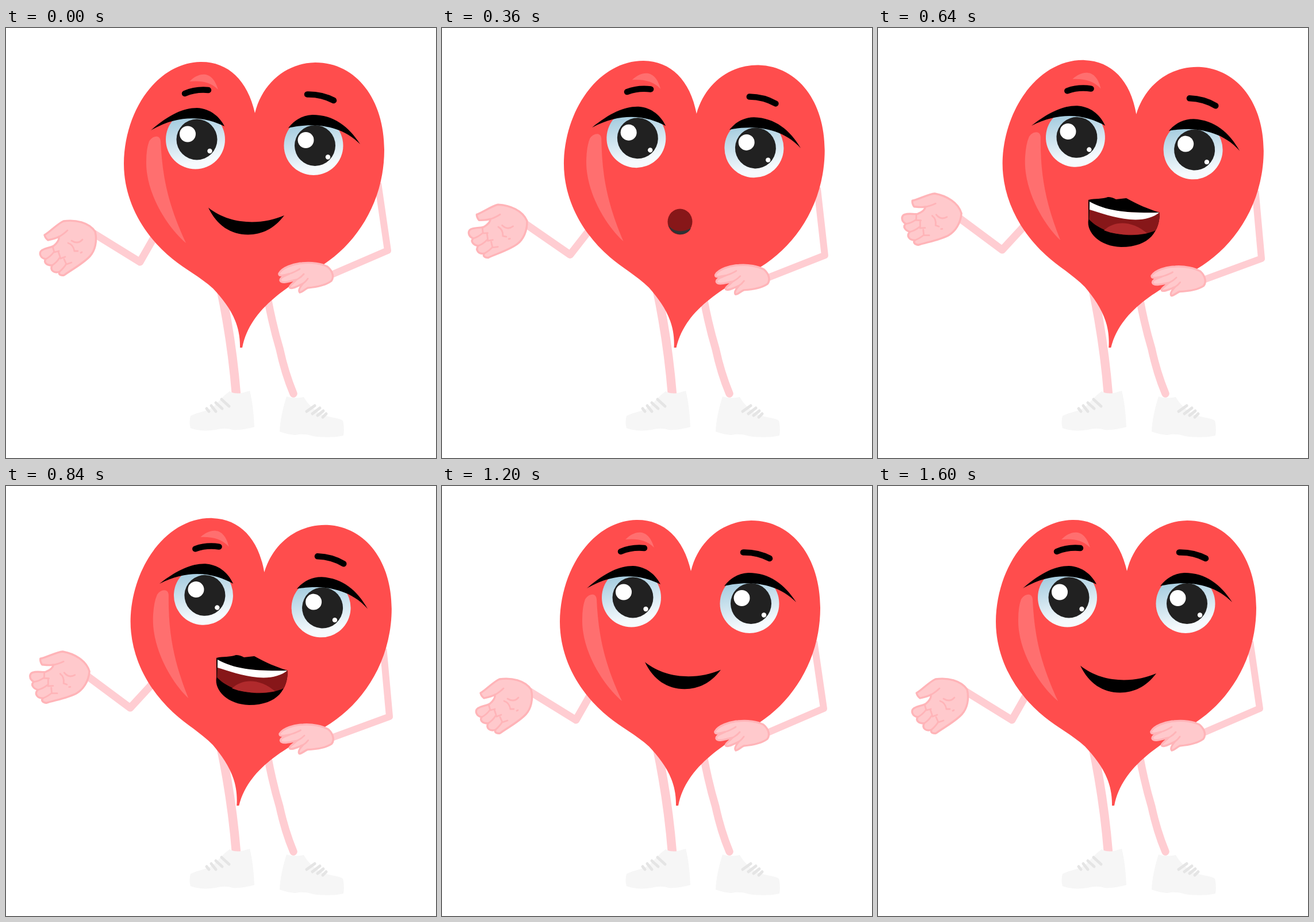
Animation, 748 px wide and 748 px high, one loop 1640 ms. Source, as an HTML page:

```html
<!DOCTYPE html>
<html lang="en">
<head>
<meta charset="utf-8">
<title>Talking heart</title>
<style>
  html, body { margin: 0; width: 100%; height: 100%; overflow: hidden; background: #fff; }
  svg { display: block; width: 100%; height: 100%; }
  .limb { fill: none; stroke: #ffcdd2; stroke-linejoin: round; }
  .skin { fill: #ffc9cc; stroke: #ffb4b8; stroke-width: 3.4; stroke-linejoin: round; }
  .crease { fill: none; stroke: #ffb4b8; stroke-width: 2.8; stroke-linecap: round; }
  .shoe { fill: #f6f6f6; }
  .lace { fill: none; stroke: #e5e5e5; stroke-width: 5; stroke-linecap: round; }
  .shine { fill: #ff6f6f; }
  .brow { fill: none; stroke: #000; stroke-width: 10.5; stroke-linecap: round; }
  .lid { fill: #871719; }
</style>
</head>
<body>
<svg viewBox="0 0 748 748">
  <defs>
    <linearGradient id="sclera" x1="0.2" y1="0" x2="0.45" y2="1">
      <stop offset="0.15" stop-color="#a6cde0"/>
      <stop offset="0.9" stop-color="#f6fafd"/>
    </linearGradient>
    <clipPath id="leftClip"><path id="leftCover"/></clipPath>
    <clipPath id="rightClip"><path id="rightCover"/></clipPath>
    <g id="eye">
      <circle cx="-2.5" cy="0" r="51.5" fill="url(#sclera)"/>
      <circle r="35.5" fill="#212121"/>
      <circle cx="-16" cy="-9.5" r="14" fill="#fff"/>
      <circle cx="22.5" cy="20" r="4.2" fill="#fff"/>
    </g>
  </defs>

  <g id="legs">
    <path class="limb" stroke-width="15.5" d="M374 455Q393 545 400.5 637"/>
    <path class="limb" stroke-width="13.5" stroke-linecap="round" stroke-linejoin="round" d="M455 470Q464 518 476 558Q485 600 500 636"/>
    <path class="shoe" d="M321 675C335 667 352 668 365 655C376 643 382 637 389 632Q397 637 410 635L424 631C429 650 431 672 432 694C420 697 408 700 394 699C386 696 375 696 365 699Q340 703 321 696Q318 686 321 675Z"/>
    <path class="lace" d="M375 646L388 658M365 652L376 662M357 657L365 667M349 662L353 667"/>
    <path class="shoe" d="M488 641Q500 645 518 642C525 654 534 663 547 671C560 678 577 677 586 683Q589 695 587 709C570 713 547 712 534 710C523 706 511 706 503 708Q489 707 476 702C477 681 482 660 488 641Z"/>
    <path class="lace" d="M523 667L537 657M533 671L546 661M542 674L552 666M551 677L557 671"/>
  </g>

  <path id="arm" class="limb" stroke-width="13"/>
  <g id="palm">
    <path class="skin" d="M67 360C75 356 90 340 100 336C121 333 144 338 155 354C159 371 155 387 146 397C134 410 113 421 101 430C94 431 91 428 93 424C84 427 76 422 80 413C71 413 65 408 69 402C59 400 57 391 62 387C69 382 78 382 83 379C89 374 93 369 92 363C85 367 77 368 73 369Q68 365 67 360Z"/>
    <path class="crease" d="M91 364Q101 358 107 352M69 402Q77 398 83 390M80 413Q88 408 93 400M93 424Q101 417 105 410M81 380L84 390L92 388M91 389L95 401L103 398M101 402L105 411L114 408M114 370Q125 377 133 368M108 374Q117 377 119 388L125 388M130 391L132 390"/>
  </g>

  <g id="body">
    <path class="limb" stroke-width="12" d="M647 270L664 387L562 431"/>
    <path fill="#ff4d4d" d="M433 148C420 90 385 58 338 59C263 61 206 143 205 236C205 300 238 360 290 402C312 420 338 433 360 453C385 480 408 510 407 556L411 556C425 480 510 440 553 411C612 372 658 300 658 212C658 125 610 60 538 60C488 61 446 95 433 148Z"/>
    <path class="shine" d="M319 93C336 76 359 73 369 107C356 94 339 91 319 93Z"/>
    <path class="shine" d="M249 197C255 187 268 185 269 197C272 260 282 307 313 374C281 347 243 288 244 232Q244 210 249 197Z"/>
    <path class="brow" d="M311 114Q330 106 352 108"/>
    <path class="brow" d="M524 115.5Q549 115 570 126"/>
    <use href="#eye" x="332" y="194"/>
    <use href="#eye" x="537.5" y="204.5"/>
    <circle class="lid" cx="328.5" cy="196" r="56.5" clip-path="url(#leftClip)"/>
    <circle class="lid" cx="534" cy="205" r="56.5" clip-path="url(#rightClip)"/>
    <path id="leftLash"/>
    <path id="rightLash"/>

    <path id="smile" d="M352 312.5C390 343 445 343 484 326C466 350 445 359 421 359.5C391 359 367 344 352 312.5Z"/>
    <g id="round" transform="rotate(-1.86 406 450)">
      <ellipse cx="414" cy="337" rx="21.5" ry="22.5" fill="#871719"/>
      <path fill="#2d3335" d="M393 342C402 356 421 356 433 348C427 363 401 364 393 342Z"/>
    </g>
    <g id="open" transform="rotate(-3.1 406 450)">
      <path d="M366 299C378 296 390 298 400 294Q407 294 414 298Q423 297 432 296C452 307 470 315 490 321C490 352 474 381 423 381C386 380 362 356 366 333Z"/>
      <path fill="#871719" d="M368 304C400 320 440 322 490 321C490 337 487 345 483 352C450 367 395 362 367 333Z"/>
      <path fill="#b02a2c" d="M393 352C412 334 442 335 468 357C445 361 415 361 393 352Z"/>
      <path fill="#fff" d="M368 302C400 320 440 322 489 321C478 331 458 335 438 333C410 330 388 322 368 316Z"/>
    </g>

    <path class="skin" d="M475 427C480 417 500 410 515 409C532 407 549 410 559 415C570 424 570 435 566 440C554 449 537 451 525 452C519 455 515 460 511 460C508 457 512 450 516 445C505 450 498 454 494 452C491 449 500 444 505 438C494 440 480 446 477 439C477 433 486 431 492 428C483 430 474 433 475 427Z"/>
    <path class="crease" d="M492 428Q504 424 511 419M505 438Q513 434 518 428M516 445Q521 442 525 436"/>
  </g>
</svg>
<script>
  const LOOP = 1640, STEP = 40;
  const byId = id => document.getElementById(id);
  const clamp = v => Math.max(0, Math.min(1, v));
  const mix = (from, to, k) => from.map((v, i) => v + (to[i] - v) * k);

  // Outer corner, upper edge in two curves, then the lower edge back; open and half shut.
  const lashes = {
    left: [
      [252,178, 283,151, 308,139, 332,139, 356,140, 372,155, 380,171, 350,156, 305,147, 252,178],
      [250,216, 285,191, 312,184, 333,184, 358,185, 377,198, 383,215, 350,200, 308,184, 250,216]
    ],
    right: [
      [616,202, 596,171, 570,151, 533,151, 515,152, 502,160, 491,174, 515,168, 575,160, 616,202],
      [607,237, 580,208, 550,192, 522,192, 503,193, 485,202, 477,216, 500,203, 550,196, 607,237]
    ]
  };
  const armRest = [277,330, 233,407, 152,357];
  const armRaised = [288,308, 216,386, 138,328];
  const mouths = [[0, 'smile'], [280, 'round'], [480, 'open'], [560, 'round'], [640, 'open'],
                  [720, 'round'], [800, 'open'], [880, 'round'], [960, 'smile']];

  const leanAt = t => clamp((t - 240) / 200) - clamp((t - 1000) / 200);
  const blinkAt = t => Math.max(0, 1 - Math.abs(t - 120) / 80, 1 - Math.abs(t - 1280) / 80);

  function drawLash(side, blink) {
    const p = mix(...lashes[side], blink * 2);
    const upper = `M${p.slice(0, 2)}C${p.slice(2, 14)}`;
    byId(side + 'Lash').setAttribute('d', `${upper}C${p.slice(14)}Z`);
    byId(side + 'Cover').setAttribute('d', blink ? `${upper}V100H${p[0]}Z` : 'M0 0');
  }

  function draw(t) {
    const lean = leanAt(t), blink = blinkAt(t);
    byId('body').setAttribute('transform', `rotate(${3.1 * lean} 406 450)`);
    byId('palm').setAttribute('transform', `rotate(${18.5 * lean} 246.8 308)`);
    byId('arm').setAttribute('d', `M${mix(armRest, armRaised, lean)}`);
    drawLash('left', blink);
    drawLash('right', blink);

    const mouth = mouths.filter(([start]) => start <= t).pop()[1];
    for (const id of ['smile', 'round', 'open'])
      byId(id).setAttribute('visibility', id === mouth ? 'visible' : 'hidden');
    byId('smile').setAttribute('transform', t >= 960 && t < 1600 ? 'translate(1 -6.2)' : '');
  }

  const begin = performance.now();
  function tick() {
    const t = (performance.now() - begin) % LOOP;
    draw(Math.floor(t / STEP) * STEP);
    requestAnimationFrame(tick);
  }
  tick();
</script>
</body>
</html>
```
